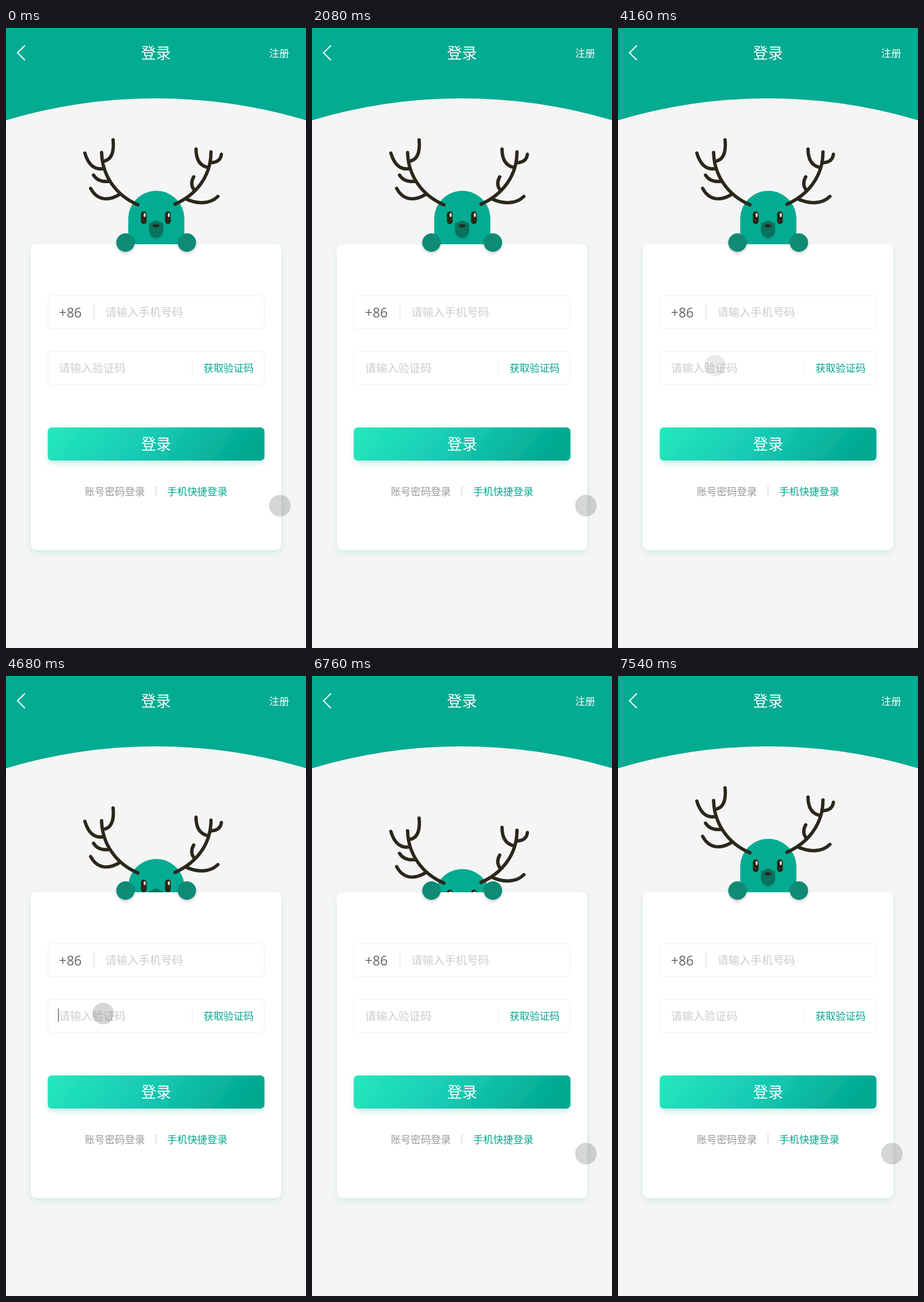
An HTML page that plays this animation: 521 px wide and 1075 px high, repeating every 8000 ms.

```html
<!DOCTYPE html>
<html lang="zh-CN">
<head>
<meta charset="utf-8">
<title>登录</title>
<style>
  html, body { margin: 0; width: 100%; height: 100%; overflow: hidden; background: #f5f5f5; }
  svg { display: block; width: 100%; height: 100%; }
  text { font-family: "Noto Sans CJK SC", "Noto Sans CJK", sans-serif; font-weight: 350; }
  .latin { font-family: "Open Sans", "Noto Sans", sans-serif; font-weight: 400; }
  .antlers { fill: none; stroke: #2b271a; stroke-width: 5.8; stroke-linecap: round; }
  .field { fill: #fff; stroke: #eee; }
  .hint { fill: #ccc; font-size: 19.3px; }
  .link { font-size: 17.45px; }
  .middle { text-anchor: middle; font-size: 26px; fill: #fff; }
  .green { fill: #02a78e; }
</style>
</head>
<body>
<svg viewBox="0 0 521 1075">
  <defs>
    <linearGradient id="buttonFill" x1="0" y1="0" x2="1" y2=".12">
      <stop offset="0" stop-color="#23e9bd"/>
      <stop offset=".5" stop-color="#18cab4"/>
      <stop offset="1" stop-color="#00a88f"/>
    </linearGradient>
    <filter id="cardShadow" x="-10%" y="-10%" width="120%" height="120%">
      <feDropShadow dx="0" dy="5" stdDeviation="6" flood-color="#02ab91" flood-opacity=".14"/>
    </filter>
    <filter id="buttonShadow" x="-10%" y="-40%" width="120%" height="200%">
      <feDropShadow dx="0" dy="5" stdDeviation="5" flood-color="#02ab91" flood-opacity=".2"/>
    </filter>
    <filter id="handShadow" x="-40%" y="-40%" width="180%" height="180%">
      <feDropShadow dx="0" dy="3" stdDeviation="2" flood-color="#000" flood-opacity=".18"/>
    </filter>
    <g id="eye">
      <rect x="-5" y="-11" width="10" height="22" rx="5" fill="#2b271a"/>
      <rect x="0" y="-8" width="3.2" height="6.4" rx="1.5" fill="#fff5e6"/>
    </g>
  </defs>

  <rect width="521" height="1075" fill="#f5f5f5"/>
  <path d="M0 0H521V160A912 912 0 0 0 0 160Z" fill="#02ab91"/>
  <path d="M32.3 30.7 20 43 32.3 55.3" fill="none" stroke="#fff" stroke-width="2" stroke-linecap="round"/>
  <text class="middle" x="260.5" y="52.5">登录</text>
  <text x="457" y="50" font-size="17.5" fill="#fff">注册</text>

  <rect x="43.5" y="375" width="434" height="530" rx="9" fill="#fff" filter="url(#cardShadow)"/>

  <g id="deer">
    <path d="M212.3 390V331A48.7 48.7 0 0 1 309.7 331V390Z" fill="#02ab91"/>
    <ellipse cx="261" cy="357" rx="11" ry="10.5" fill="#0a9f88"/>
    <path d="M248.3 338Q254 337.5 256 335.2Q261 332.5 266 335.2Q268 337.5 273 338V351.5A12.3 12.3 0 0 1 248.3 351.5Z" fill="#07735f"/>
    <path d="M256.5 340.5H265Q268 343 265.5 345H263L260.8 347 258.5 345H256Q253.5 343 256.5 340.5Z" fill="#2b271a"/>
    <use id="leftEye" href="#eye"/>
    <use id="rightEye" href="#eye"/>
    <g class="antlers">
      <path d="M166 216C167 255 190 290 229 306.5"/>
      <path d="M186 194C188 216 183 229 169 231"/>
      <path d="M137 217C143 237 153 246 168 244"/>
      <path d="M152 255C158 265 168 267 179 266"/>
      <path d="M147 278C158 299 178 301 198 288"/>
      <path d="M356 215C356 258 329 290 293.5 305.5"/>
      <path d="M330 210C330 228 337 239 351 242"/>
      <path d="M374 219C373 229 366 233 356 233.5"/>
      <path d="M326 258C321 267 322 275 327 281"/>
      <path d="M368 292C354 306 332 305 314 297"/>
    </g>
  </g>

  <rect x="43.5" y="375" width="434" height="530" rx="9" fill="#fff"/>
  <g fill="#0c8b74" filter="url(#handShadow)">
    <circle cx="207.5" cy="372" r="16"/>
    <circle cx="314.2" cy="372" r="16"/>
  </g>

  <rect class="field" x="72.8" y="464" width="375.8" height="57.5" rx="8"/>
  <text class="latin" x="92" y="501.5" font-size="23" fill="#666">+86</text>
  <path d="M153 478.5V507" stroke="#ddd"/>
  <text class="hint" x="172.5" y="500">请输入手机号码</text>

  <rect class="field" x="72.8" y="560.5" width="375.8" height="57.5" rx="8"/>
  <text class="hint" x="92" y="596.5">请输入验证码</text>
  <path d="M323.5 574.5V603" stroke="#eee"/>
  <text class="link green" x="343" y="596">获取验证码</text>
  <path id="caret" d="M91 576.5V600" stroke="#666" stroke-width="1.5"/>

  <rect x="72.5" y="692.5" width="376.3" height="57.5" rx="7" fill="url(#buttonFill)" filter="url(#buttonShadow)"/>
  <text class="middle" x="260.7" y="731">登录</text>

  <text class="link" x="136.7" y="810" fill="#999">账号密码登录</text>
  <path d="M260.5 794V812" stroke="#ccc"/>
  <text class="link green" x="279.8" y="810">手机快捷登录</text>

  <circle id="touch" r="18.8" fill="#000"/>
</svg>
<script>
  const LOOP = 8000, STEP = 130;
  const REST = [475.7, 828.2], FIELD = [168.8, 585.3];
  const DROP = 52.5, TOUCH_ALPHA = 0.16;
  const [deer, leftEye, rightEye, caret, touch] =
    ["deer", "leftEye", "rightEye", "caret", "touch"].map(id => document.getElementById(id));

  const ramp = (t, from, to) => Math.min(1, Math.max(0, (t - from) / (to - from)));
  const between = (t, from, to) => t >= from && t < to;
  // Falls from 1 to 0 and returns to 1 within 520 ms.
  const dip = (t, start) => Math.min(1, Math.abs(t - start - 260) / 260);

  function render(time) {
    const t = Math.floor(time / STEP) * STEP;

    const open = Math.max(0.1, dip(t, 1040) * dip(t, 1560));
    leftEye.setAttribute("transform", `translate(239.2 329) scale(1 ${open})`);
    rightEye.setAttribute("transform", `translate(281.2 329) scale(1 ${open})`);

    const hidden = ramp(t, 4160, 4940) - ramp(t, 6760, 7540);
    deer.setAttribute("transform", `translate(0 ${DROP * hidden})`);

    const travel = ramp(t, 2990, 3510) - ramp(t, 5460, 5980);
    const [x, y] = REST.map((start, i) => start + (FIELD[i] - start) * travel);
    touch.setAttribute("cx", x);
    touch.setAttribute("cy", y);
    touch.setAttribute("fill-opacity", TOUCH_ALPHA * dip(t, 3770) * dip(t, 6240));

    const caretOn = between(t, 4290, 4940) || between(t, 5720, 6500);
    caret.setAttribute("visibility", caretOn ? "visible" : "hidden");
  }

  const begin = performance.now();
  function tick() {
    render((performance.now() - begin) % LOOP);
    requestAnimationFrame(tick);
  }
  tick();
</script>
</body>
</html>
```
